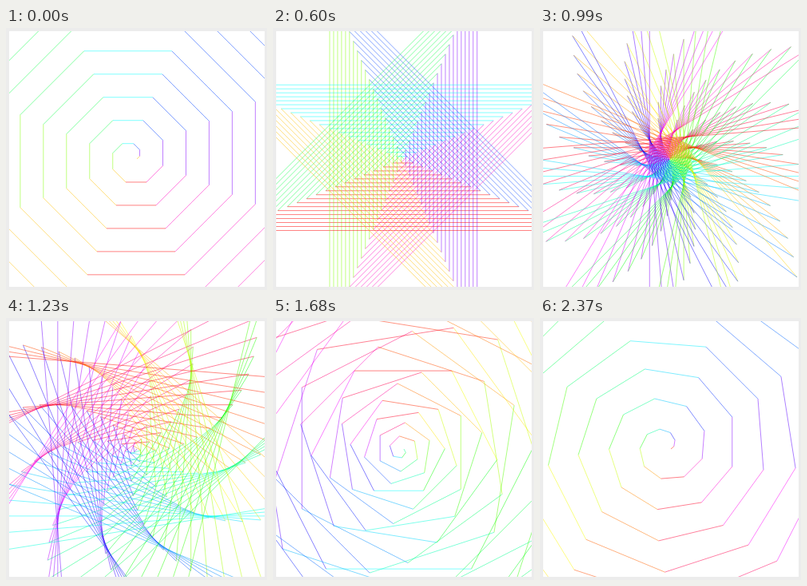
Write an HTML page with a canvas that moves like this. It is 327 by 328 pixels and loops after 2400 ms.

```html
<!DOCTYPE html>
<html lang="en">
<head>
<meta charset="utf-8">
<title>Turning spiral</title>
<style>
  html, body { margin: 0; width: 100%; height: 100%; overflow: hidden; background: #ececec; }
  canvas { position: absolute; left: 4px; top: 4px; }
</style>
</head>
<body>
<canvas id="stage" width="320" height="320"></canvas>
<script>
  const SEGMENTS = 151, SIZE = 320;
  const STEP_MS = 30, STEPS = 80;
  const START_TURN = 45, TURN_STEP = 360 / STEPS;

  const ctx = document.getElementById('stage').getContext('2d');
  const mod = (a, n) => ((a % n) + n) % n;

  // Each segment is 3px longer than the last; its heading is also its hue.
  function draw(step) {
    const turn = START_TURN + step * TURN_STEP;
    let x = SIZE / 2, y = SIZE / 2;
    ctx.fillStyle = '#fff';
    ctx.fillRect(0, 0, SIZE, SIZE);
    ctx.lineWidth = 0.5;
    for (let i = 1; i <= SEGMENTS; i++) {
      const length = 2 + 3 * i;
      const heading = mod(-turn * i, 360);
      const rad = heading * Math.PI / 180;
      // The innermost segment shares the hue of the outermost one.
      const hue = i > 1 ? heading : mod(-turn * SEGMENTS, 360);
      ctx.strokeStyle = `hsl(${hue}, 100%, 50%)`;
      ctx.beginPath();
      ctx.moveTo(x, y);
      x += length * Math.cos(rad);
      y += length * Math.sin(rad);
      ctx.lineTo(x, y);
      ctx.stroke();
    }
  }

  let shown = 0;
  const start = performance.now();
  draw(0);

  function tick() {
    const step = Math.floor(Math.max(0, performance.now() - start) / STEP_MS) % STEPS;
    if (step !== shown) draw(shown = step);
    requestAnimationFrame(tick);
  }
  requestAnimationFrame(tick);
</script>
</body>
</html>
```
